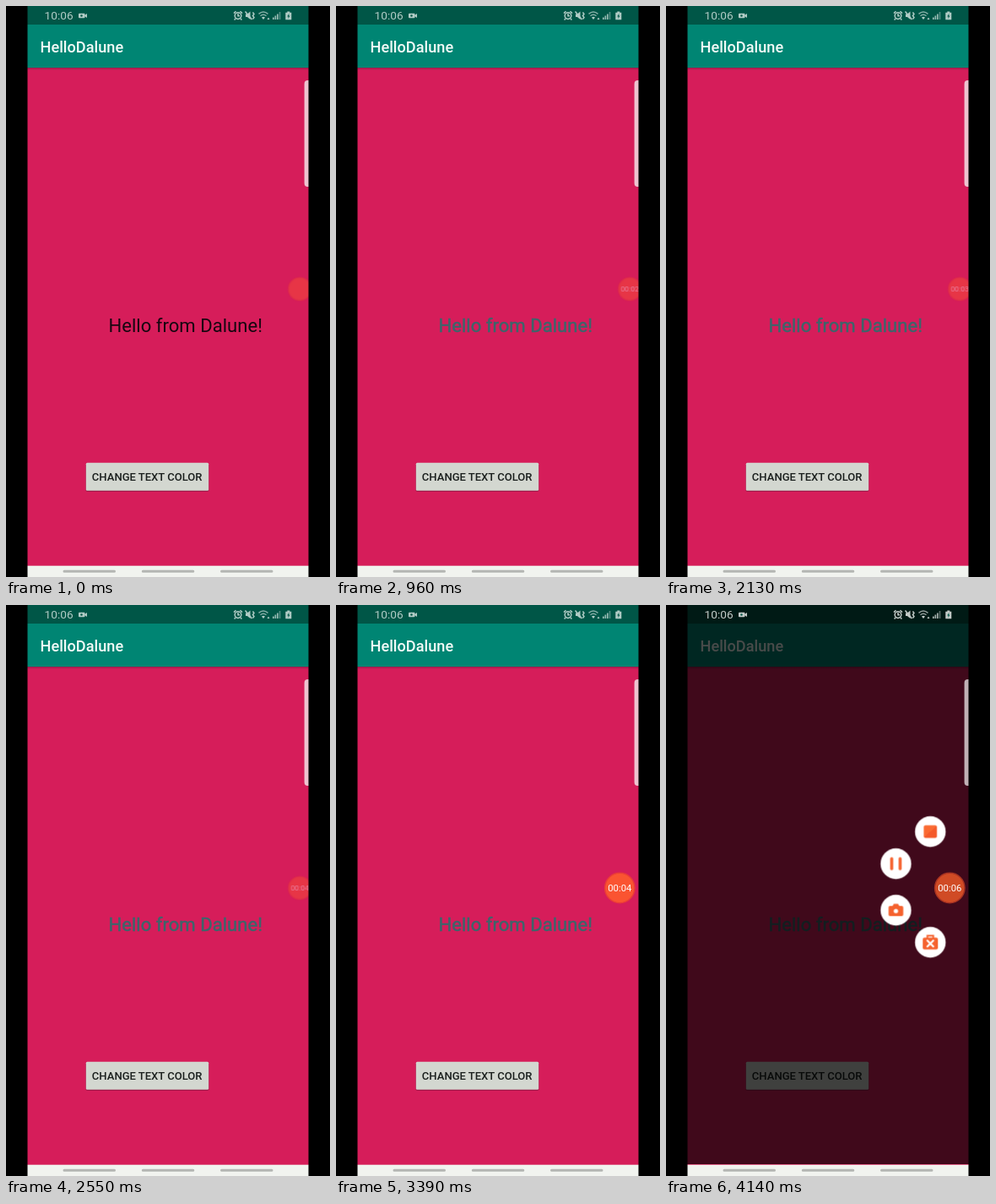
An HTML page for the animation above (4.17 s loop, 384 px wide and 676 px high).

```html
<!DOCTYPE html>
<html lang="en">
<head>
<meta charset="utf-8">
<title>Change text color</title>
<style>
html, body { margin: 0; width: 100%; height: 100%; overflow: hidden; background: #000; }
svg { display: block; width: 384px; height: 676px; font-family: Roboto, sans-serif; }
.medium { font-weight: 500; }
.hello, .shade, .bubble, .disc, .digits, .item, .status, .handle {
  animation: 4170ms linear infinite;
}
.hello { animation-name: recolor; animation-timing-function: step-end; stroke-width: .5; }
.shade { animation-name: shade; }
.bubble { animation-name: undock; transform-origin: 336px 335px; }
.disc { animation-name: dim; }
.digits { animation-name: count; animation-timing-function: step-end; }
.item { animation-name: pop; animation-timing-function: ease-out; }
.status { animation-name: brighten; }
.handle { animation-name: fadeHandle; }

@keyframes recolor {
  0% { fill: #160710; stroke: none; }
  11.5%, 100% { fill: #3c666b; stroke: #3c666b; }
}
@keyframes shade { 0%, 82.7% { opacity: 0; } 86.3%, 100% { opacity: .7; } }
@keyframes undock {
  0%, 75.5% { transform: translate(12px, 0) scale(.77); opacity: .46; }
  79.1%, 100% { transform: none; opacity: 1; }
}
@keyframes dim {
  0%, 82.7% { fill: #fa5431; stroke: #ea3c38; }
  86.3%, 100% { fill: #d04b25; stroke: #a83322; }
}
@keyframes count {
  0% { transform: translateY(0); }
  3.6% { transform: translateY(-40px); }
  14.4% { transform: translateY(-80px); }
  36% { transform: translateY(-120px); }
  57.6% { transform: translateY(-160px); }
  90% { transform: translateY(-200px); }
  97.1%, 100% { transform: translateY(-240px); }
}
@keyframes pop {
  0%, 82.7% { transform: translate(336px, 335px) scale(.3); opacity: 0; }
  86.3%, 100% { transform: translate(var(--x), var(--y)); opacity: 1; }
}
@keyframes brighten {
  0%, 82.7% { color: #b0cbc5; }
  86.3%, 100% { color: #c3cac7; }
}
@keyframes fadeHandle {
  0%, 82.7% { fill: #efc3d0; }
  86.3%, 100% { fill: #c0b1b5; }
}
</style>
</head>
<body>
<svg viewBox="0 0 384 676">
  <defs>
    <clipPath id="digit"><rect x="316" y="325" width="40" height="20"/></clipPath>
    <linearGradient id="drop" x2="0" y2="1">
      <stop stop-color="#5d1b3c" stop-opacity=".5"/>
      <stop offset="1" stop-color="#5d1b3c" stop-opacity="0"/>
    </linearGradient>
    <linearGradient id="hot" x2="1" y2="1">
      <stop offset=".5" stop-color="#fa6a32"/>
      <stop offset=".5" stop-color="#f45a2b"/>
    </linearGradient>
  </defs>

  <!-- App -->
  <rect x="25" width="334" height="676" fill="#d61d5a"/>
  <rect x="25" y="73" width="334" height="3" fill="url(#drop)"/>
  <rect x="25" y="22" width="334" height="51" fill="#008573"/>
  <rect x="25" width="334" height="22" fill="#005647"/>
  <text class="medium" x="40.5" y="54.5" font-size="18.2" fill="#f2faf7">HelloDalune</text>
  <text class="hello" x="121.5" y="386" font-size="22.1">Hello from Dalune!</text>
  <rect x="94.5" y="541.5" width="146" height="33.5" rx="2" fill="#6c1238" opacity=".5"/>
  <rect x="94.8" y="540.8" width="145.4" height="33" rx="1.5" fill="#d3d7d0"/>
  <text class="medium" x="101.8" y="562.2" font-size="13.05" fill="#1b201e">CHANGE TEXT COLOR</text>

  <rect class="shade" x="25" width="334" height="662"/>

  <!-- Status bar -->
  <g class="status" fill="currentColor">
    <text x="45.5" y="16.4" font-size="13.7">10:06</text>
    <rect x="86" y="8.7" width="7.5" height="5.6" rx="1"/>
    <path d="M93 11l3-2v5l-3-2z"/>
    <circle cx="89.5" cy="11.5" r="1.2" fill="#005647"/>
    <g fill="none" stroke="currentColor" stroke-width="1.5">
      <circle cx="275" cy="11.6" r="3.8"/>
      <path d="M270 8.600l2.500-2.300M280 8.600l-2.500-2.300M275 9v2.700h2M272 15l-1.400 1.500M278 15l1.400 1.500"/>
      <path d="M283.500 6.500l8 9.500M292.500 7.500l1.500 2-1.500 2 1.500 2-1.500 2"/>
      <path d="M299.500 9.300q5.500-4.600 11 0M301.500 11.700q3.500-3 7 0" opacity=".75"/>
    </g>
    <path d="M284 9.500h2l3.500-3V16L286 13h-2z"/>
    <path d="M303 13.500q2-1.400 4 0l-2 2.500z"/>
    <path d="M309.500 16l1.500-2.500 1.500 2.500z"/>
    <path d="M316 13.500h1.700V16H316zM318.500 11.500h1.700V16h-1.700zM321 9.500h1.700V16H321z" opacity=".85"/>
    <path d="M323.600 7h1.800v9h-1.800z" opacity=".45"/>
    <path d="M333.300 6.500h3v1.200h2v8.600h-7V7.700h2z"/>
    <path d="M335.500 8.700l-2.300 3.700h1.500l-.5 2.800 2.400-3.700h-1.500z" fill="#005647"/>
  </g>

  <rect class="handle" x="353.6" y="88" width="10" height="126" rx="4"/>

  <!-- Recorder menu -->
  <g class="item" style="--x:313.3px;--y:268.3px">
    <circle r="18.2" fill="#fff"/>
    <rect x="-7.8" y="-7.5" width="15.6" height="15" rx="2" fill="url(#hot)"/>
  </g>
  <g class="item" style="--x:272.5px;--y:306.3px">
    <circle r="18.2" fill="#fff"/>
    <path d="M-5-6V6M5-6V6" stroke="#f5622e" stroke-width="3.6" stroke-linecap="round"/>
  </g>
  <g class="item" style="--x:272.5px;--y:361.3px">
    <circle r="18.2" fill="#fff"/>
    <path d="M-7-5h3l1.5-2.5h5L4-5h3q1.700 0 1.700 1.700v8.600Q8.700 7 7 7H-7q-1.700 0-1.700-1.700v-8.600Q-8.700-5-7-5z" fill="#f5622e"/>
    <circle cy="1" r="2.6" fill="#fff"/>
  </g>
  <g class="item" style="--x:313.3px;--y:399.3px">
    <circle r="18.2" fill="#fff"/>
    <path d="M-3.500-5v-2.700h7V-5" fill="none" stroke="#f5622e" stroke-width="2"/>
    <rect x="-9" y="-5.5" width="18" height="14" rx="2" fill="#f5622e"/>
    <path d="M-3.500-2L3.500 5M3.500-2L-3.500 5" stroke="#fff" stroke-width="2.3" stroke-linecap="round"/>
  </g>

  <g class="bubble">
    <circle class="disc" cx="336.3" cy="335" r="17.7" stroke-width="1.5"/>
    <g clip-path="url(#digit)">
      <g class="digits" font-size="11.3" fill="#fff" text-anchor="middle">
        <text x="336.3" y="379">00:01</text>
        <text x="336.3" y="419">00:02</text>
        <text x="336.3" y="459">00:03</text>
        <text x="336.3" y="499">00:04</text>
        <text x="336.3" y="539">00:05</text>
        <text x="336.3" y="579">00:06</text>
      </g>
    </g>
  </g>

  <!-- Navigation bar -->
  <rect x="25" y="662.7" width="334" height="14" fill="#f1f3ef"/>
  <path d="M69 669.300H128.500M162.300 669.300H221.800M255.500 669.300H315" stroke="#b4b6b3" stroke-width="3" stroke-linecap="round"/>

  <!-- Side bars -->
  <path d="M0 0h25.500v676H0zM358.500 0H384v676h-25.500z"/>
</svg>
</body>
</html>
```
